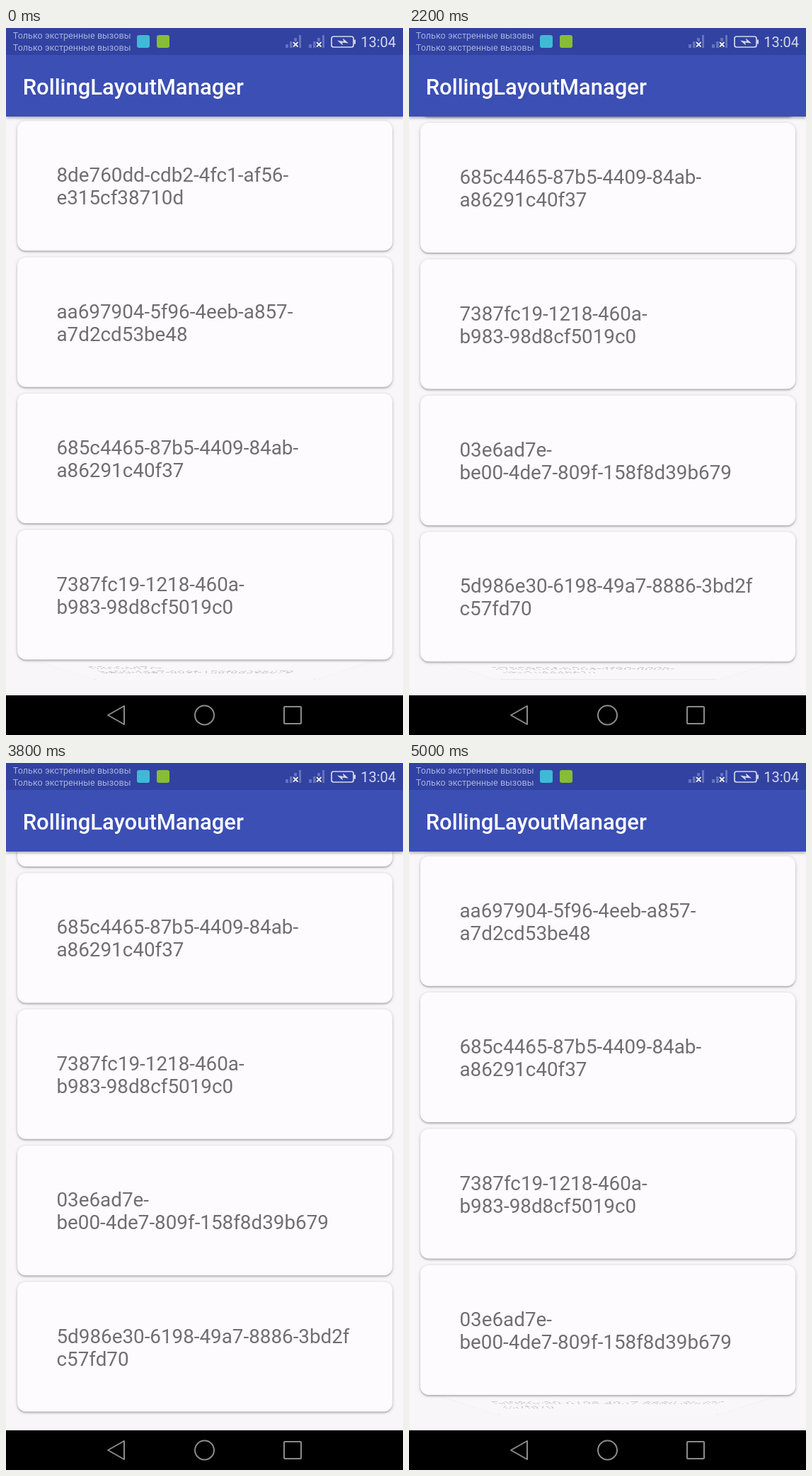
These frames come from a looping animation (561x998 px, 5.1 s). An HTML page:

```html
<!DOCTYPE html>
<html lang="ru">
<head>
<meta charset="utf-8">
<title>RollingLayoutManager</title>
<style>
html, body { margin: 0; width: 100%; height: 100%; overflow: hidden; background: #f8f6f9; }
#stage { position: relative; width: 561px; height: 998px; overflow: hidden; font-family: Roboto, sans-serif; }
#list { position: absolute; left: 0; top: 0; width: 561px; height: 942px; overflow: hidden; }
.card {
  position: absolute; left: 15.5px; top: 0; width: 530px; height: 183px;
  box-sizing: border-box; padding: 60.5px 0 0 56px;
  background: #fdfbfe; border-radius: 12px; transform-origin: 50% 0;
  box-shadow: 0 2px 2px rgba(0,0,0,.18), 0 1px 5px rgba(0,0,0,.2);
  font-size: 27.8px; line-height: 32.8px; color: #706e71; white-space: pre;
}
#bar {
  position: absolute; left: 0; top: 0; width: 561px; height: 124.5px; z-index: 20;
  background: linear-gradient(#3142a1 38px, #3c4fb4 38px);
  box-shadow: 0 2px 4px rgba(0,0,0,.32);
}
#chrome { position: absolute; left: 0; top: 0; z-index: 30; }
</style>
</head>
<body>
<div id="stage">
  <div id="list"></div>
  <div id="bar"></div>
  <svg id="chrome" width="561" height="998" viewBox="0 0 561 998">
    <defs>
      <g id="signal">
        <path d="M0 28V23H4V28ZM6 28V19H10V28ZM12 28V14H16V28ZM19 28V10H22V28Z" fill="#6673bd"/>
        <path d="M10.5 19.5L18 27M18 19.5L10.5 27" stroke="#2c3b92" stroke-width="5"/>
        <path d="M11 20L17.5 26.5M17.5 20L11 26.5" stroke="#eef0fa" stroke-width="1.9"/>
      </g>
    </defs>
    <g fill="#a9b2de" font-size="12.6">
      <text x="9.8" y="15">Только экстренные вызовы</text>
      <text x="9.8" y="32">Только экстренные вызовы</text>
    </g>
    <rect x="185" y="10" width="18" height="18" rx="3" fill="#3fb9d6"/>
    <rect x="213" y="10" width="18" height="18" rx="3" fill="#86bd34"/>
    <use href="#signal" x="395"/>
    <use href="#signal" x="428"/>
    <rect x="460" y="12" width="31" height="15" rx="3" fill="none" stroke="#d5d9ef" stroke-width="1.7"/>
    <path d="M492 16.5H494V22.5H492Z" fill="#d5d9ef"/>
    <path d="M468 17.5L477 19L476 14.5L484 21.5L475 20.5L476 24.5Z" fill="#d5d9ef"/>
    <text x="501.2" y="26.5" font-size="20" fill="#d5d9ef">13:04</text>
    <text x="23.7" y="93.5" font-size="31" font-weight="500" fill="#fff">RollingLayoutManager</text>
    <rect y="942" width="561" height="56"/>
    <g fill="none" stroke="#8b8b8b" stroke-width="2">
      <path d="M144 970L167 957V983Z" stroke-linejoin="round"/>
      <circle cx="280.5" cy="970" r="13.5"/>
      <rect x="393" y="958" width="24" height="24" rx="1"/>
    </g>
  </svg>
</div>
<script>
const LOOP = 5100, STEP = 100;
const FIRST = 131.3, PITCH = 192.4, HEIGHT = 183, FLOOR = 940;

const labels = [
  '8de760dd-cdb2-4fc1-af56-\ne315cf38710d',
  'aa697904-5f96-4eeb-a857-\na7d2cd53be48',
  '685c4465-87b5-4409-84ab-\na86291c40f37',
  '7387fc19-1218-460a-\nb983-98d8cf5019c0',
  '03e6ad7e-\nbe00-4de7-809f-158f8d39b679',
  '5d986e30-6198-49a7-8886-3bd2f\nc57fd70',
  '3785956f-b56a-4f90-800b-\nd5c1c444561a'
];

// [time in ms, scroll in px]
const keys = [
  [800, 0], [1500, 251.5], [2200, 382], [2600, 517], [2900, 548],
  [3300, 475.5], [4200, 282.5], [4400, 262], [4500, 262], [5000, 192]
];

const secant = i => (keys[i + 1][1] - keys[i][1]) / (keys[i + 1][0] - keys[i][0]);

function slope(i) {
  if (i === 0 || i === keys.length - 1) return 0;
  const a = secant(i - 1), b = secant(i);
  return a * b > 0 ? 2 * a * b / (a + b) : 0;
}

// Monotone cubic through the keys
function scrollAt(t) {
  if (t <= keys[0][0]) return 0;
  let i = 0;
  while (i < keys.length - 2 && t > keys[i + 1][0]) i++;
  const [t0, y0] = keys[i], [t1, y1] = keys[i + 1];
  const h = t1 - t0, u = Math.min(1, (t - t0) / h), v = 1 - u;
  return y0 * v * v * (1 + 2 * u) + y1 * u * u * (3 - 2 * u)
    + h * u * v * (slope(i) * v - slope(i + 1) * u);
}

const list = document.getElementById('list');
const cards = labels.map((label, i) => {
  const card = document.createElement('div');
  card.className = 'card';
  card.textContent = label;
  card.style.zIndex = labels.length - i;
  list.append(card);
  return card;
});

// A card rolls away around its top edge as it passes the floor
function place(card, top) {
  const roll = Math.max(0, (top + HEIGHT - FLOOR) / HEIGHT);
  const visible = roll < 1 && top > -HEIGHT;
  card.style.visibility = visible ? 'visible' : 'hidden';
  if (!visible) return;
  const lift = 24.5 * roll ** 1.5;
  card.style.opacity = 1 - 0.9 * roll;
  card.style.transform = `translateY(${top - lift}px)`
    + (roll ? ` perspective(253px) rotateX(${-90 * roll}deg)` : '');
}

function draw(now) {
  const t = Math.floor((now % LOOP) / STEP) * STEP;
  const scroll = scrollAt(t);
  cards.forEach((card, i) => place(card, FIRST + i * PITCH - scroll));
}

const start = performance.now();
function tick() {
  draw(performance.now() - start);
  requestAnimationFrame(tick);
}
tick();
</script>
</body>
</html>
```
